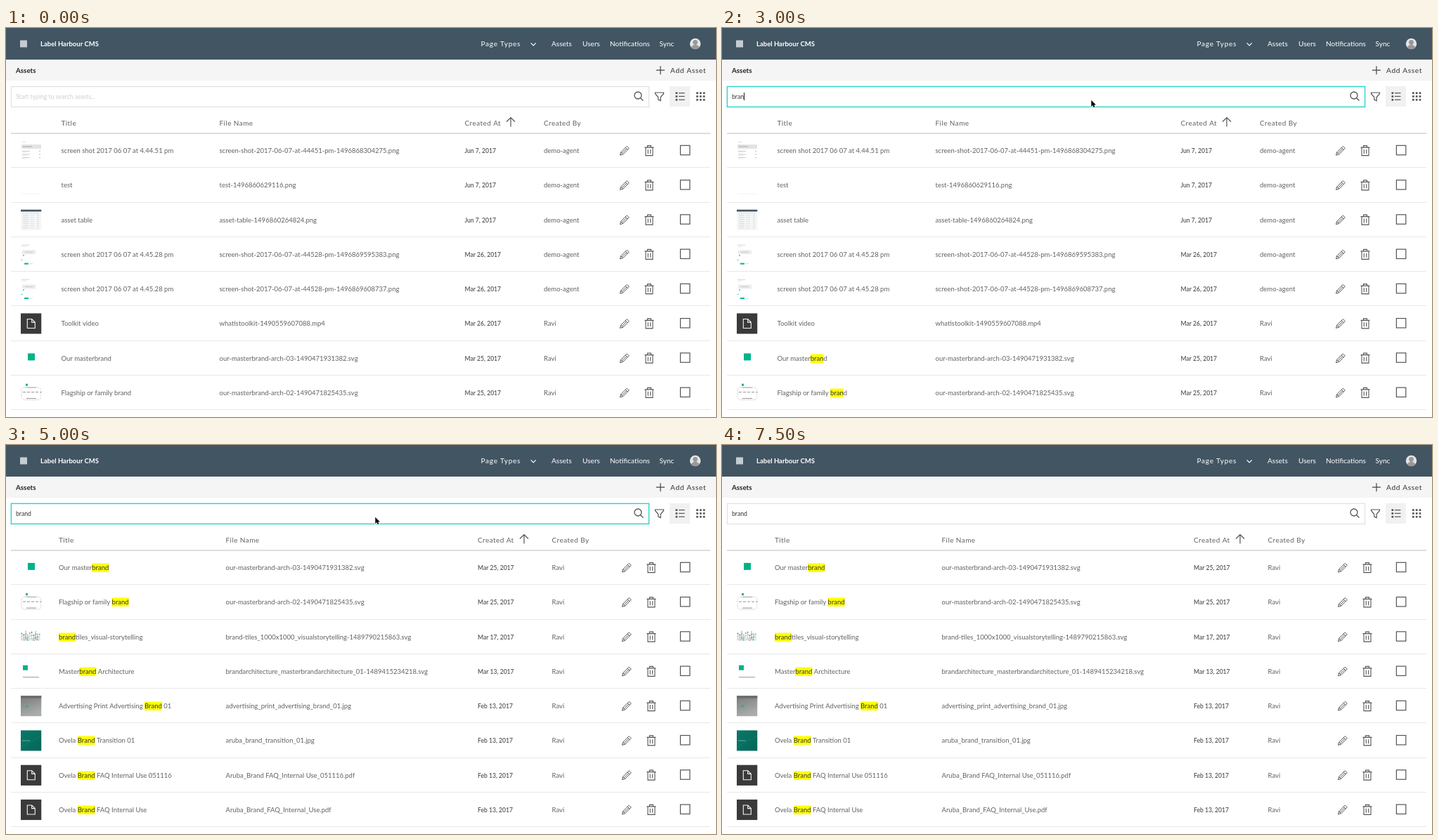
Write an HTML page with a canvas that moves like this. It is 1010 by 554 pixels and loops after 8250 ms.

```html
<!DOCTYPE html>
<html lang="en">
<head>
<meta charset="utf-8">
<title>Assets</title>
<style>
html, body { margin: 0; width: 100%; height: 100%; overflow: hidden; background: #fff; }
canvas { display: block; }
</style>
</head>
<body>
<canvas id="stage" width="1010" height="554"></canvas>
<script>
const ctx = document.getElementById('stage').getContext('2d');
const LOOP = 8250, ROW = 49.25, TOP = 150, THUMB = 29.5, BODY = 9.5;
const INK = '#626262', LINE = '#555', TEAL = '#00b388', SLATE = '#425563';

// Each step: start time, then the state that holds from there on
const typing = [[0, ''], [2500, 'b'], [2750, 'br'], [3000, 'bran'], [3500, 'brand']];
const caret = [[0, 0], [1750, 1], [4000, 0], [4500, 1], [5000, 0], [5500, 1], [6000, 0]];
const pointer = [[0, null], [500, [626, 126.5]], [750, [600, 126]], [1000, [592, 124.5]],
  [1250, [525.3, 102.7]], [5500, [522, 102.7]], [5750, null],
  [7000, [394.5, 96]], [7250, [578, 56]], [7500, null]];

const before = {
  cols: [78.5, 303.5, 652.5, 765], edit: 880, bin: 915, arrow: 718,
  rows: [
    ['screen shot 2017 06 07 at 4.44.51 pm', 'screen-shot-2017-06-07-at-44451-pm-1496868304275.png', 'Jun 7, 2017', 'demo-agent', 'list'],
    ['test', 'test-1496860629116.png', 'Jun 7, 2017', 'demo-agent', 'blank'],
    ['asset table', 'asset-table-1496860264824.png', 'Jun 7, 2017', 'demo-agent', 'table'],
    ['screen shot 2017 06 07 at 4.45.28 pm', 'screen-shot-2017-06-07-at-44528-pm-1496869595383.png', 'Mar 26, 2017', 'demo-agent', 'form'],
    ['screen shot 2017 06 07 at 4.45.28 pm', 'screen-shot-2017-06-07-at-44528-pm-1496869608737.png', 'Mar 26, 2017', 'demo-agent', 'form'],
    ['Toolkit video', 'whatistoolkit-1490559607088.mp4', 'Mar 26, 2017', 'Ravi', 'file'],
    ['Our masterbrand', 'our-masterbrand-arch-03-1490471931382.svg', 'Mar 25, 2017', 'Ravi', 'mark'],
    ['Flagship or family brand', 'our-masterbrand-arch-02-1490471825435.svg', 'Mar 25, 2017', 'Ravi', 'chart']
  ]
};
const after = {
  cols: [75, 312.5, 671, 776.5], edit: 883, bin: 918, arrow: 737,
  rows: [
    ...before.rows.slice(6),
    ['brandtiles_visual-storytelling', 'brand-tiles_1000x1000_visualstorytelling-1489790215863.svg', 'Mar 17, 2017', 'Ravi', 'crowd'],
    ['Masterbrand Architecture', 'brandarchitecture_masterbrandarchitecture_01-1489415234218.svg', 'Mar 13, 2017', 'Ravi', 'smallMark'],
    ['Advertising Print Advertising Brand 01', 'advertising_print_advertising_brand_01.jpg', 'Feb 13, 2017', 'Ravi', 'photo'],
    ['Ovela Brand Transition 01', 'aruba_brand_transition_01.jpg', 'Feb 13, 2017', 'Ravi', 'cover'],
    ['Ovela Brand FAQ Internal Use 051116', 'Aruba_Brand FAQ_Internal Use_051116.pdf', 'Feb 13, 2017', 'Ravi', 'file'],
    ['Ovela Brand FAQ Internal Use', 'Aruba_Brand_FAQ_Internal_Use.pdf', 'Feb 13, 2017', 'Ravi', 'file']
  ]
};

const at = (steps, t) => steps.filter(s => s[0] <= t).pop()[1];

function font(size, weight = 400, gap = 0) {
  ctx.font = `${weight} ${size}px Lato, "Open Sans", sans-serif`;
  ctx.letterSpacing = gap + 'px';
}
function text(str, x, y, color, size, weight, gap) {
  font(size, weight, gap);
  ctx.fillStyle = color;
  ctx.fillText(str, x, y);
}
function box(x, y, w, h, color) {
  ctx.fillStyle = color;
  ctx.fillRect(x, y, w, h);
}
function frame(x, y, w, h, color, line = 1) {
  ctx.strokeStyle = color;
  ctx.lineWidth = line;
  ctx.strokeRect(x, y, w, h);
}
function disc(x, y, r, color) {
  ctx.fillStyle = color;
  ctx.beginPath();
  ctx.arc(x, y, r, 0, 7);
  ctx.fill();
}
function path(d, x, y, color, line = 1.2) {
  ctx.save();
  ctx.translate(x, y);
  ctx.strokeStyle = color;
  ctx.lineWidth = line;
  ctx.stroke(new Path2D(d));
  ctx.restore();
}
function fade(x, y, from, to) {
  const g = ctx.createLinearGradient(0, 0, x, y);
  g.addColorStop(0, from);
  g.addColorStop(1, to);
  box(0, 0, THUMB, THUMB, g);
}

// Thumbnails draw inside a square of side THUMB
const thumbs = {
  list() {
    box(2, 2, 5, 1, '#ddd');
    box(1, 6, 28, 6, '#e3e3e3');
    box(3, 8.5, 13, 1, '#aaa');
    for (let y = 15; y < 28; y += 4.5) {
      box(2, y, 11, 1, '#ccc');
      box(2, y + 1.6, 7, .8, '#e2e2e2');
      box(26, y, 2, 1, '#bbb');
    }
  },
  blank() { box(1, 26.5, 27, 1, '#f3f3f3'); },
  table() {
    box(0, 0, THUMB, THUMB, '#f5f6f6');
    box(0, 0, THUMB, 3, SLATE);
    box(2, 5, 24, 1, '#dfe2e4');
    for (let y = 8; y < 28; y += 3) {
      box(3, y, 8, .8, '#cdd2d5');
      box(13, y, 6, .8, '#dde0e2');
      box(23, y, 3, .8, '#cdd2d5');
    }
  },
  form() {
    box(1, 1, 11, .8, '#ccc');
    box(1, 3, 7, .8, '#ddd');
    box(2, 8.5, 19, 6, '#ececec');
    box(6, 11, 11, 1, '#c5c5c5');
    box(3, 15.5, 2, 1.5, '#4ab9cc');
    box(0, 22, 3, 1, '#92c9df');
    box(5, 27, 6, 2, TEAL);
    box(13, 27.5, 4, 1, '#bfe6dd');
  },
  file(dim) {
    box(0, 0, THUMB, THUMB, '#3a3a3a');
    path('M9.3 8.3H15.7L20.3 12.9V21.3H9.3ZM15.7 8.3V12.9H20.3', 0, 0, dim ? '#858585' : '#f4f4f4', 1.1);
  },
  mark() { box(10, 8, 10, 10, TEAL); },
  chart() {
    box(7, 2, 3, 3, TEAL);
    ctx.beginPath();
    ctx.roundRect(1, 7, 28, 18, 5);
    ctx.strokeStyle = '#bbb';
    ctx.lineWidth = .7;
    ctx.setLineDash([2, 1]);
    ctx.stroke();
    ctx.setLineDash([]);
    box(8, 7, 14, .8, '#999');
    for (let x = 3; x < 28; x += 6) box(x, 13.5, 4, .9, '#888');
    box(8, 22.5, 14, .9, '#888');
  },
  crowd() {
    const tones = ['#7dcdbb', '#e27968', '#777', '#00a982', '#c3c3c3'];
    for (let i = 0; i < 10; i++) {
      const x = 1.5 + i * 2.8, y = 10 + 3 * Math.sin(i * 2.4);
      disc(x, y, 1, tones[(i + 2) % 5]);
      path(`M0 1L0 7L-1.3 ${20 - y}M0 7L1.4 ${20 - y}M-1.5 5L1.5 3`, x, y, tones[i % 5], .7);
    }
  },
  smallMark() {
    box(3, 6, 7, 7, TEAL);
    box(3, 22.5, 23, 1, '#999');
  },
  photo() {
    fade(10, THUMB, '#777a79', '#a9acab');
    box(0, 0, THUMB, 4, '#6c6f6e');
    box(6, 13, 5, 4, '#57a293');
  },
  cover() {
    fade(THUMB, THUMB, '#0a7869', '#056657');
    path('M0 24L29 8', 0, 0, '#168371', .7);
    box(2, 14.5, 11, .8, '#7dbbaf');
  }
};

function title(str, x, y, query) {
  const i = query ? str.toLowerCase().indexOf(query) : -1;
  if (i < 0) return text(str, x, y, INK, BODY);
  font(BODY);
  const end = i + query.length;
  const a = x + ctx.measureText(str.slice(0, i)).width;
  const b = x + ctx.measureText(str.slice(0, end)).width;
  box(a, y - 9.5, b - a, 12.5, '#ff0');
  text(str.slice(0, i), x, y, INK, BODY);
  text(str.slice(i, end), a, y, '#333', BODY);
  text(str.slice(end), b, y, INK, BODY);
}

function header() {
  box(0, 0, 1010, 45, SLATE);
  box(20, 17.5, 10, 10, '#c4ccd1');
  text('Label Harbour CMS', 49, 26, '#fff', 9.5, 700);
  text('Page Types', 675.5, 26, '#fff', 10.1, 400, .7);
  path('M-3.6 -1.6L0 2L3.6 -1.6', 750.2, 23, '#fff');
  [['Assets', 776], ['Users', 820], ['Notifications', 859], ['Sync', 929.5]]
    .forEach(([s, x]) => text(s, x, 26, '#fff', 10.1));

  ctx.save();
  ctx.beginPath();
  ctx.arc(980.5, 22.5, 7.7, 0, 7);
  ctx.clip();
  box(972, 14, 17, 17, '#e6e6e6');
  disc(980.5, 20.5, 3.4, '#999');
  disc(980.5, 30, 6.2, '#999');
  ctx.restore();

  box(0, 45, 1010, 30, '#f5f5f5');
  text('Assets', 14, 64, '#222', 9.8, 700);
  path('M-6 0H6M0 -6V6', 931, 60.2, '#444');
  text('Add Asset', 945, 64, '#333', 10.2, 400, .6);
}

function search(t, query) {
  const focused = t >= 1750 && t < 6500;
  frame(7.4, 83.4, 907.2, 29, focused ? '#2ad2c9' : '#dcdcdc', focused ? 1.4 : 1);
  if (query) text(query, 14, 101, '#333', 8.7);
  else text('Start typing to search assets...', 14, 101, '#cfcfcf', 8.7);
  font(8.7);
  if (at(caret, t)) box(Math.round(14 + ctx.measureText(query).width), 92, 1, 11, '#222');

  path('M4 -1A5 5 0 1 1 -6 -1A5 5 0 1 1 4 -1ZM2.6 2.7L6.5 6.5', 900, 97, LINE, 1.3);
  path('M-6 -5.5H6V-4L1.7 1V6L-1.7 4.5V1L-6 -4Z', 929.5, 97.5, LINE);
  box(944, 83, 29, 29, '#f1f1f1');
  for (let i = 0; i < 3; i++) {
    const y = 91.3 + i * 4.8;
    box(952.5, y, 2.7, 2.7, LINE);
    box(957, y + .7, 8.5, 1.2, LINE);
    for (let j = 0; j < 3; j++) box(982 + j * 4.8, y, 2.7, 2.7, LINE);
  }
}

function table(t, view, query) {
  ['Title', 'File Name', 'Created At', 'Created By']
    .forEach((s, i) => text(s, view.cols[i], 138.8, INK, 10, 400, .42));
  path('M0 6.5V-6.5M-6 -.5L0 -6.5L6 -.5', view.arrow, 134, LINE);
  box(7, 149.5, 995, 1.2, '#c8c8c8');

  view.rows.forEach(([name, file, date, by, thumb], i) => {
    const mid = TOP + ROW * (i + .5), y = Math.round(mid + 3.4);
    const loading = view === after && t < 4750;
    if (!loading || i < 2 || thumb === 'file') {
      ctx.save();
      ctx.translate(21, mid - 14.7);
      ctx.beginPath();
      ctx.rect(0, 0, THUMB, THUMB);
      ctx.clip();
      thumbs[thumb](loading);
      ctx.restore();
    }
    title(name, view.cols[0], y, query);
    text(file, view.cols[1], y, INK, BODY);
    text(date, view.cols[2], y, LINE, 8.6, 600);
    text(by, view.cols[3], y, INK, BODY);
    path('M-6.5 6.5L-5.3 2.3L3.3 -6.3L6.3 -3.3L-2.3 5.3ZM-5.3 2.3L-2.3 5.3M1.2 -4.2L4.2 -1.2M-3.6 3.7L2.7 -2.6',
      view.edit, mid, LINE, 1);
    path('M-6.5 -4.5H6.5M-2.5 -4.5V-7H2.5V-4.5M-5 -4.5V7H5V-4.5M-1.7 -1.7V4.4M1.7 -1.7V4.4',
      view.bin, mid, LINE, 1.1);
    frame(959.4, mid - 7.3, 13.4, 13.4, LINE, 1.2);
    box(7, Math.round(TOP + ROW * (i + 1)) - 1, 995, 1, '#e8e8e8');
  });
}

function drawPointer(pos) {
  if (!pos) return;
  const arrow = new Path2D('M0 0V9.2L2.1 7.3L3.6 10.6L5.2 9.9L3.8 6.7H6.6Z');
  ctx.save();
  ctx.translate(...pos);
  ctx.strokeStyle = '#fff';
  ctx.lineWidth = 1.4;
  ctx.stroke(arrow);
  ctx.fillStyle = '#000';
  ctx.fill(arrow);
  ctx.restore();
}

function draw(now) {
  const t = now % LOOP, query = at(typing, t);
  box(0, 0, 1010, 554, '#fff');
  header();
  search(t, query);
  table(t, t < 4500 ? before : after, query);
  drawPointer(at(pointer, t));
}

const start = performance.now();
function tick() {
  draw(performance.now() - start);
  requestAnimationFrame(tick);
}
tick();
</script>
</body>
</html>
```
